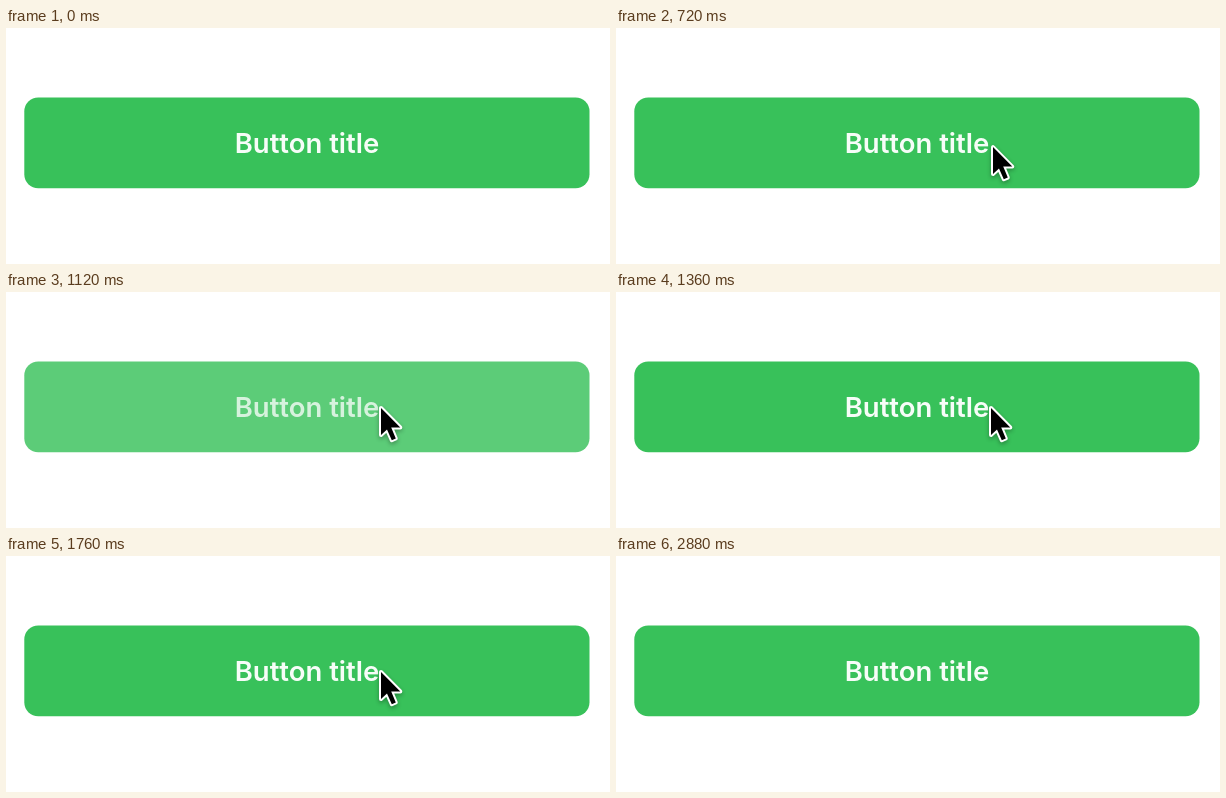
These frames come from a looping animation (604 px wide and 236 px high, 3.52 s). An HTML page with a canvas:

```html
<!DOCTYPE html>
<html lang="en">
<head>
<meta charset="utf-8">
<title>Button press</title>
<style>
  html, body { margin: 0; width: 100%; height: 100%; overflow: hidden; background: #fff; }
  canvas { display: block; }
</style>
</head>
<body>
<canvas id="stage" width="604" height="236"></canvas>
<script>
const ctx = document.getElementById('stage').getContext('2d');
const LOOP = 3520, STEP = 80;
const PRESSES = [1200, 1600], PRESS_HALF = 160, PRESS_DIM = 0.37;
const ENTER = 480, LEAVE = 1920;
const REST = { x: 375, y: 116 };

const arrow = new Path2D('M0 0V27L6 21.5L10.8 32.2L14.8 30.5L10.2 19.5H19.3Z');

const clamp01 = v => Math.min(1, Math.max(0, v));

// Each press dims the button along a raised cosine
function dimAt(t) {
  const pulse = p => Math.cos(clamp01(Math.abs(t - p) / PRESS_HALF) * Math.PI / 2) ** 2;
  return PRESS_DIM * Math.max(...PRESSES.map(pulse));
}

// Shoots in from below, drifts a little, then speeds away downwards
function cursorAt(t) {
  const rise = 60 * Math.exp((ENTER - t) / 35);
  const drift = 1 - clamp01((t - 720) / 320);
  const fall = 30 * (Math.max(0, t - LEAVE) / 240) ** 1.5;
  return {
    x: REST.x + 2 * drift + 0.05 * fall,
    y: REST.y + 3 * drift + rise + fall
  };
}

function drawButton(dim) {
  ctx.fillStyle = `rgba(56, 193, 90, ${1 - dim})`;
  ctx.beginPath();
  ctx.roundRect(18.3, 69.4, 565.2, 90.9, 14);
  ctx.fill();

  // The title dims a little more than its background
  ctx.fillStyle = `rgba(255, 255, 255, ${0.96 - dim * 1.15})`;
  ctx.font = '600 27.5px Inter, "Open Sans", sans-serif';
  ctx.textAlign = 'center';
  ctx.fillText('Button title', 301, 125.4);
}

function drawCursor({ x, y }) {
  ctx.save();
  ctx.translate(x, y);
  ctx.lineWidth = 4;
  ctx.lineJoin = 'round';
  ctx.strokeStyle = '#fff';
  ctx.shadowColor = 'rgba(0, 0, 0, 0.3)';
  ctx.shadowBlur = 4;
  ctx.shadowOffsetY = 2;
  ctx.stroke(arrow);
  ctx.shadowColor = 'transparent';
  ctx.fillStyle = '#000';
  ctx.fill(arrow);
  ctx.restore();
}

function draw(elapsed) {
  const t = Math.floor((elapsed % LOOP) / STEP) * STEP;
  ctx.fillStyle = '#fff';
  ctx.fillRect(0, 0, 604, 236);
  drawButton(dimAt(t));
  drawCursor(cursorAt(t));
}

const start = performance.now();
function tick() {
  draw(performance.now() - start);
  requestAnimationFrame(tick);
}
tick();
</script>
</body>
</html>
```
